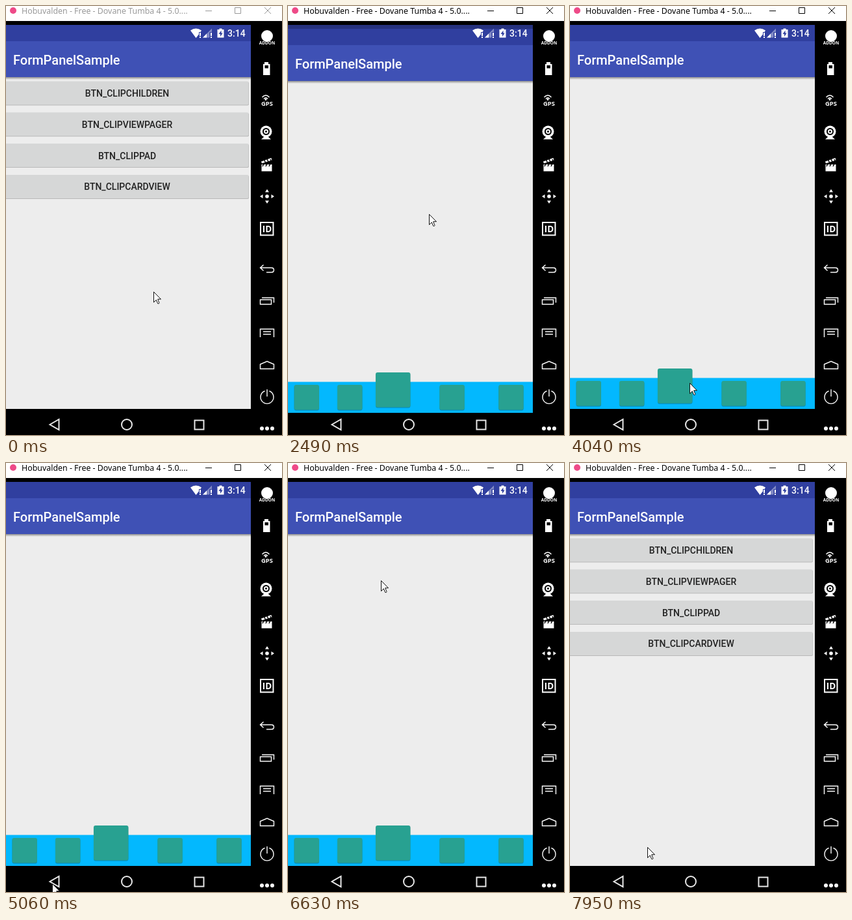
Write an HTML page that moves like this. It is 425 px wide and 658 px high and loops after 8000 ms.

```html
<!DOCTYPE html>
<html lang="en">
<head>
<meta charset="utf-8">
<title>Emulator recording</title>
<style>
  html, body { margin: 0; width: 100%; height: 100%; overflow: hidden; background: #000; }
  svg { display: block; width: 425px; height: 658px; font-family: Roboto, sans-serif; font-weight: 500; }
  .line { fill: none; stroke: #fff; stroke-width: 1.4; }
  .nav { fill: none; stroke: #e8e8e8; stroke-width: 2; }
  .mid { text-anchor: middle; }
  .bold { font-family: "Open Sans", sans-serif; font-weight: 700; }
</style>
</head>
<body>
<svg viewBox="0 0 425 658">
  <defs>
    <linearGradient id="fade" x2="0" y2="1">
      <stop stop-color="#000" stop-opacity=".4"/>
      <stop offset="1" stop-color="#000" stop-opacity="0"/>
    </linearGradient>
    <clipPath id="navClip"><path d="M0 618H377V658H0Z"/></clipPath>
    <g id="chrome">
      <path fill="#ededed" d="M0 109H377V618H0Z"/>
      <path fill="#303f9f" d="M0 29H377V54H0Z"/>
      <path fill="#3f51b5" d="M0 54H377V109H0Z"/>
      <path fill="url(#fade)" d="M0 109H377V113H0Z"/>
      <text x="11" y="90" font-size="20" fill="#fff">FormPanelSample</text>
    </g>
  </defs>
  <path d="M0 0H425V658H0Z"/>

  <!-- window title bar -->
  <path fill="#fff" d="M0 0H425V23H0Z"/>
  <circle cx="11" cy="7" r="5" fill="#ee4a88"/>
  <g id="titleBar" fill="currentColor">
    <text x="24" y="12" font-size="12.4" font-weight="400" font-family="Noto Sans, sans-serif">Hobuvalden - Free - Dovane Tumba 4 - 5.0....</text>
    <path fill="none" stroke="currentColor" d="M307 7.500H317M352.500 2.500H361.500V11.500H352.500ZM398 2L408 12M408 2L398 12"/>
  </g>

  <use href="#chrome"/>
  <g id="buttons" class="mid" font-size="14"></g>

  <!-- navigation bar -->
  <circle id="navRipple" cx="74" cy="640" r="53" fill="#fff" opacity=".15" clip-path="url(#navClip)"/>
  <path class="nav" d="M67.500 642L81.500 634V650ZM290.500 635.500H304.500V649.500H290.500Z"/>
  <circle class="nav" cx="186" cy="642" r="8"/>

  <g id="page">
    <path opacity=".2" d="M0 23H377V29H0Z"/>
    <use href="#chrome"/>
    <path fill="#03b8fe" d="M0 570.500H377V618H0Z"/>
    <g id="tiles" fill="#28a191"></g>
  </g>

  <!-- status icons -->
  <g fill="#fff">
    <path d="M284 37.500Q292.500 31.500 301 37.500L299.500 40H297V43.500L292.500 49Z"/>
    <path fill-opacity=".4" d="M303 48.500L317 34.500V40H313.500V48.500Z"/>
    <path d="M303 48.500L309 42.500V48.500ZM298 41H300V46H298ZM298 47H300V49H298ZM315 41H317V46H315ZM315 47H317V49H315Z"/>
    <path d="M325.500 36H328.500V34.500H332.500V36H335.500V48.500H325.500Z"/>
    <path fill="#303f9f" d="M331.500 37.500L327.500 43H330V47L333.700 41.500H331.500Z"/>
    <text x="341" y="47" font-size="14">3:14</text>
  </g>

  <path d="M377 23H425V658H377Z"/>
  <g id="toolBar" fill="#fff"></g>

  <path id="cursor" fill="#fff" stroke="#111" d="M.5 .5V16.500L4.300 12.800L6.800 18.500H8.300L9 17.500L6.700 11.700H11.500Z"/>
</svg>

<script>
const LOOP = 8000;
const byId = id => document.getElementById(id);
const fillWith = (id, items, markup) => { byId(id).innerHTML = items.map(markup).join(""); };
const line = d => `<path class="line" d="${d}"/>`;
const disc = (r, x = 0, y = 0, fill = "#fff") => `<circle cx="${x}" cy="${y}" r="${r}" fill="${fill}"/>`;
const label = (text, y, size) => `<text class="mid bold" y="${y}" font-size="${size}">${text}</text>`;

fillWith("buttons", ["CLIPCHILDREN", "CLIPVIEWPAGER", "CLIPPAD", "CLIPCARDVIEW"], (name, i) =>
  `<g transform="translate(0 ${115.5 + i * 47.8})">
    <rect x="-3" y="1" width="377" height="36" rx="2" fill="#b9b9b9"/>
    <rect class="face" x="-3" width="376.500" height="36" rx="2" fill="#d6d7d7"/>
    <text x="186.500" y="23.500" fill="#212121">BTN_${name}</text>
  </g>`);
const firstButton = document.querySelector(".face");

// The selected third tile is enlarged; the tiles after it are spaced wider.
fillWith("tiles", [0, 1, 2, 3, 4], i => {
  const selected = i === 2;
  const size = selected ? 53.5 : 38.5;
  const x = 28.7 + 66.5 * i + 24.4 * Math.max(0, i - 2) - size / 2;
  const y = (selected ? 609.5 : 613.5) - size;
  const square = `<rect x="${x}" y="${y}" width="${size}" height="${size}" rx="3"`;
  return `${square} transform="translate(0 1)" fill="#000" opacity=".25"/>${square}/>`;
});

// Each icon is drawn around its own centre.
const deviceIcons = [
  disc(9) + label("ADDON", 13, 6.5),
  `<path d="M-4-9H2V-6H4.500V11H-6V-6H-4Z"/><path fill="#000" d="M-3.500-4H2V.5H-3.500Z"/>`,
  line("M-7.500-5Q-2-11 3.500-5M-5-2.500Q-2-6 1-2.500") + disc(1.4, -2, -1.5) + label("GPS", 8, 9.5),
  disc(9, -1.5, -1.5) + disc(5.5, -1.5, -1.5, "#000") + disc(3.5, -1.5, -1.5) + disc(1.5, -1.5, -1.5, "#000") +
    `<path d="M-4 6H1L6 10.500H-9Z"/>`,
  `<path d="M-8.500 0H7.500V10.500H-8.500ZM-9-4.500L6.500-10L7.500-6.500L-8-1.500Z"/>` + [-5, 0, 5].map(x =>
    `<path stroke="#000" stroke-width="1.500" d="M${x}-8L${x + 2.5}-3M${x}-1L${x - 2} 3"/>`).join(""),
  disc(2.8) + [0, 90, 180, 270].map(a => `<path transform="rotate(${a})" d="M0-11L3-6.500H-3Z"/>`).join(""),
  `<path class="line" style="stroke-width:2" d="M-10-10H9.500V9.500H-10Z"/>` + label("ID", 5, 13.5),
];
const keyIcons = [
  line("M-5.500-5L-10.500-.5L-5.500 4M-10.500-.5H6.500Q10.500-.5 10.500 3T6.500 6.500H-1"),
  line("M-10.500-.5H6.500V6.500H-10.500ZM-8-3.500H10.500V4"),
  line("M-10.500 8V-4.500H10.500V8M-6-.5H6M-6 3.500H6"),
  line("M-10.500 6.500V-.5L0-5L10.500-.5V6.500Z"),
  line("M-3.500-8.500A10 10 0 1 0 3.500-8.500M0-11V0"),
  [-8, 0, 8].map(x => disc(3, x)).join(""),
];
fillWith("toolBar", [...deviceIcons, ...keyIcons], (icon, i) =>
  `<g transform="translate(402 ${Math.round(46 + 49.25 * i + (i < deviceIcons.length ? 0 : 11))})">${icon}</g>`);

// Cursor stops; it travels in straight lines between them.
const stops = [
  { at: 120, x: 227, y: 438 },
  { at: 390, x: 194, y: 270 },
  { at: 810, x: 213, y: 140 },
  { at: 2340, x: 213, y: 140 },
  { at: 2490, x: 217, y: 319 },
  { at: 3210, x: 253, y: 412 },
  { at: 3360, x: 277, y: 552 },
  { at: 3900, x: 157, y: 572 },
  { at: 4610, x: 293, y: 600 },
  { at: 5060, x: 71, y: 645 },
  { at: 5500, x: 71, y: 645 },
  { at: 6630, x: 143, y: 180 },
  { at: 7530, x: 90, y: 627 },
  { at: 7950, x: 119, y: 589 },
];

function cursorAt(t) {
  const next = stops.findIndex(stop => stop.at > t);
  const to = stops.at(next), from = stops[Math.max(0, next - 1)];
  if (next <= 0) return [to.x, to.y];
  const k = (t - from.at) / (to.at - from.at);
  return [from.x + (to.x - from.x) * k, from.y + (to.y - from.y) * k].map(Math.round);
}

function draw(t) {
  const during = (start, end) => t >= start && t < end;
  const show = (id, visible) => { byId(id).style.display = visible ? "" : "none"; };

  byId("titleBar").style.color = t < 1890 ? "#999" : "#000";
  firstButton.setAttribute("fill", during(2040, 2480) ? "#bfc0c0" : "#d6d7d7");

  const opening = t < 2630, closing = t >= 7530;
  show("page", during(2480, 7680));
  byId("page").setAttribute("transform", `translate(0 ${opening ? 6 : closing ? 28 : 0})`);
  byId("page").setAttribute("opacity", closing ? 0.42 : 1);

  show("navRipple", during(5340, 5600) || during(7680, 7800));
  byId("cursor").setAttribute("transform", `translate(${cursorAt(t)})`);
}

function tick() {
  draw(performance.now() % LOOP);
  requestAnimationFrame(tick);
}
tick();
</script>
</body>
</html>
```
